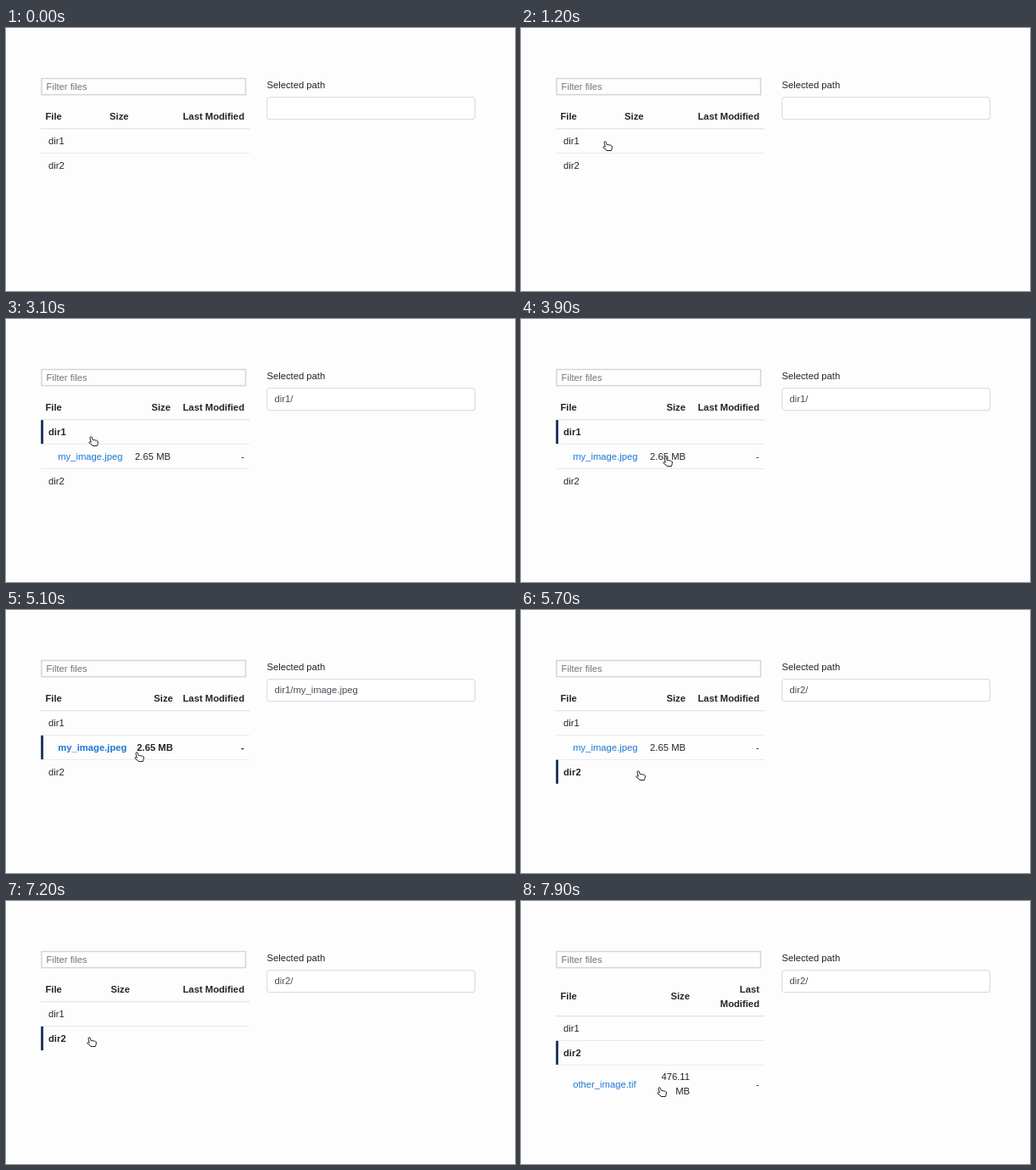
An HTML page with a canvas for the animation above (8000 ms loop, 600 by 310 pixels).

```html
<!DOCTYPE html>
<html lang="en">
<head>
<meta charset="utf-8">
<title>File browser</title>
<style>
html, body { margin: 0; width: 100%; height: 100%; overflow: hidden; background: #fdfdfe; }
canvas { display: block; width: 600px; height: 310px; }
</style>
</head>
<body>
<canvas id="stage"></canvas>
<script>
const LOOP = 8000, STEP = 100;
const ROW = 28.75, LINE = 16.9, HEAD_TOP = 90.1;
const INK = '#212529', RULE = '#dee2e6', LINK = '#1f78d1', BAR = '#1e3557';
const canvas = document.getElementById('stage');
const ratio = window.devicePixelRatio || 1;
canvas.width = 600 * ratio;
canvas.height = 310 * ratio;
const ctx = canvas.getContext('2d');
ctx.scale(ratio, ratio);

const image = { name: 'my_image.jpeg', size: ['2.65 MB'], file: true };
const tif = { name: 'other_image.tif', size: ['476.11', 'MB'], file: true };
const dir1 = { name: 'dir1' };
const dir2 = { name: 'dir2' };

const closed = [dir1, dir2];
const firstOpen = [dir1, image, dir2];
const secondOpen = [dir1, dir2, tif];

// sizeRight: right edge of the Size column
const states = [
  { at: 0, rows: closed, picked: null, path: '', sizeRight: 144.6 },
  { at: 1700, rows: closed, picked: dir1, path: 'dir1/', sizeRight: 146 },
  { at: 3100, rows: firstOpen, picked: dir1, path: 'dir1/', sizeRight: 194 },
  { at: 4100, rows: firstOpen, picked: image, path: 'dir1/my_image.jpeg', sizeRight: 196.8 },
  { at: 5700, rows: firstOpen, picked: dir2, path: 'dir2/', sizeRight: 194 },
  { at: 6500, rows: firstOpen, picked: dir1, path: 'dir1/', sizeRight: 194 },
  { at: 6700, rows: closed, picked: dir1, path: 'dir1/', sizeRight: 146 },
  { at: 7200, rows: closed, picked: dir2, path: 'dir2/', sizeRight: 146 },
  { at: 7400, rows: secondOpen, picked: dir2, path: 'dir2/', sizeRight: 199 }
];

// Pointer track: time, x, y
const track = [
  [800, 173, 257], [1200, 96, 133], [1700, 96, 133], [2200, 106, 150],
  [2300, 106, 150], [2400, 107, 152], [2500, 107, 152], [2700, 97, 138],
  [3200, 97, 138], [3700, 166, 161], [3800, 166, 161], [3900, 167, 162],
  [4300, 172, 164], [4700, 172, 164], [4900, 164, 155], [5100, 151, 167],
  [5400, 135, 189], [5800, 135, 189], [6300, 95, 129], [6700, 95, 129],
  [7000, 95, 160], [7400, 95, 160], [7900, 160, 219], [8000, 160, 219]
];

function pointerAt(t) {
  if (t < track[0][0]) return null;
  const i = Math.max(1, track.findIndex(k => k[0] >= t));
  const [t0, x0, y0] = track[i - 1];
  const [t1, x1, y1] = track[i];
  const u = (t - t0) / (t1 - t0);
  const e = u * u * (3 - 2 * u);
  return [x0 + (x1 - x0) * e, y0 + (y1 - y0) * e];
}

function text(str, x, y, { bold = false, color = INK, align = 'left' } = {}) {
  ctx.font = `${bold ? 'bold ' : ''}11.25px "Liberation Sans", Arial, sans-serif`;
  ctx.fillStyle = color;
  ctx.textAlign = align;
  ctx.fillText(str, x, y);
}

function fill(color, x, y, w, h) {
  ctx.fillStyle = color;
  ctx.fillRect(x, y, w, h);
}

function drawFields(path) {
  ctx.strokeStyle = '#d3d5db';
  ctx.lineWidth = 1.5;
  ctx.strokeRect(41.9, 59.5, 240.6, 19.1);
  text('Filter files', 47.6, 73.1, { color: '#757575' });

  text('Selected path', 307.4, 71);
  ctx.strokeStyle = '#d2d7dd';
  ctx.lineWidth = 1;
  ctx.beginPath();
  ctx.roundRect(307.8, 81.7, 245, 26, 2.8);
  ctx.fillStyle = '#fff';
  ctx.fill();
  ctx.stroke();
  text(path, 316.6, 98.3, { color: '#495057' });
}

function drawHead(tall, sizeRight) {
  const base = 108, mid = tall ? base + LINE / 2 : base;
  const right = { bold: true, align: 'right' };
  text('File', 46.5, mid, { bold: true });
  text('Size', sizeRight, mid, right);
  if (tall) {
    text('Last', 281, base, right);
    text('Modified', 281, base + LINE, right);
  } else {
    text('Last Modified', 281, base, right);
  }
}

function drawTable({ rows, picked, sizeRight }) {
  const tall = rows === secondOpen;
  drawHead(tall, sizeRight);
  let y = HEAD_TOP + ROW + (tall ? LINE : 0);
  fill(RULE, 41, y - 0.7, 246, 1.2);

  rows.forEach((row, i) => {
    const lines = row.size ? row.size.length : 1;
    const height = ROW + (lines - 1) * LINE;
    const base = y + 18.2, mid = base + (lines - 1) * LINE / 2;
    const bold = row === picked;
    if (i) fill('#e4e7eb', 41, y - 0.4, 246, 0.8);
    if (bold) fill(BAR, 41.1, y + 0.3, 2.9, height - 0.6);
    text(row.name, row.file ? 61.2 : 50, mid, { bold, color: row.file ? LINK : INK });
    if (row.file) {
      row.size.forEach((part, n) => text(part, sizeRight, base + n * LINE, { bold, align: 'right' }));
      text('-', 280.8, mid, { bold, align: 'right' });
    }
    y += height;
  });
}

const hand = new Path2D(
  'M3.3 7.2 L2 2.2 Q1.9 .8 3.1 .8 Q4.2 .8 4.5 2 L5.2 4.7 ' +
  'Q6.2 4 7 4.9 Q8.2 4.3 8.8 5.2 Q10 4.7 10.5 5.7 Q11.4 5.6 11.4 7 ' +
  'L11.1 9.2 L10.4 11.5 L5 11.5 L4 10 L1.3 8.3 Q.4 7.2 1.4 6.7 Q2.3 6.5 3.3 7.2 Z'
);
const arrow = new Path2D('M2.5 .8 L2.5 10.4 L4.8 8.4 L6.2 11.5 L7.8 10.8 L6.4 7.8 L9.4 7.7 Z');

function drawPointer([x, y]) {
  const shape = y > 176 && y > 225 ? arrow : hand;
  ctx.save();
  ctx.translate(x, y);
  ctx.lineWidth = 0.95;
  ctx.lineJoin = 'round';
  ctx.strokeStyle = '#1b1b1d';
  ctx.fillStyle = '#fff';
  ctx.fill(shape);
  ctx.stroke(shape);
  ctx.restore();
}

function draw(now) {
  const t = Math.floor((now % LOOP) / STEP) * STEP;
  const state = states.findLast(s => s.at <= t);
  fill('#fdfdfe', 0, 0, 600, 310);
  drawFields(state.path);
  drawTable(state);
  const pointer = pointerAt(t);
  if (pointer) drawPointer(pointer);
}

const start = performance.now();
function tick() {
  draw(performance.now() - start);
  requestAnimationFrame(tick);
}
tick();
</script>
</body>
</html>
```
